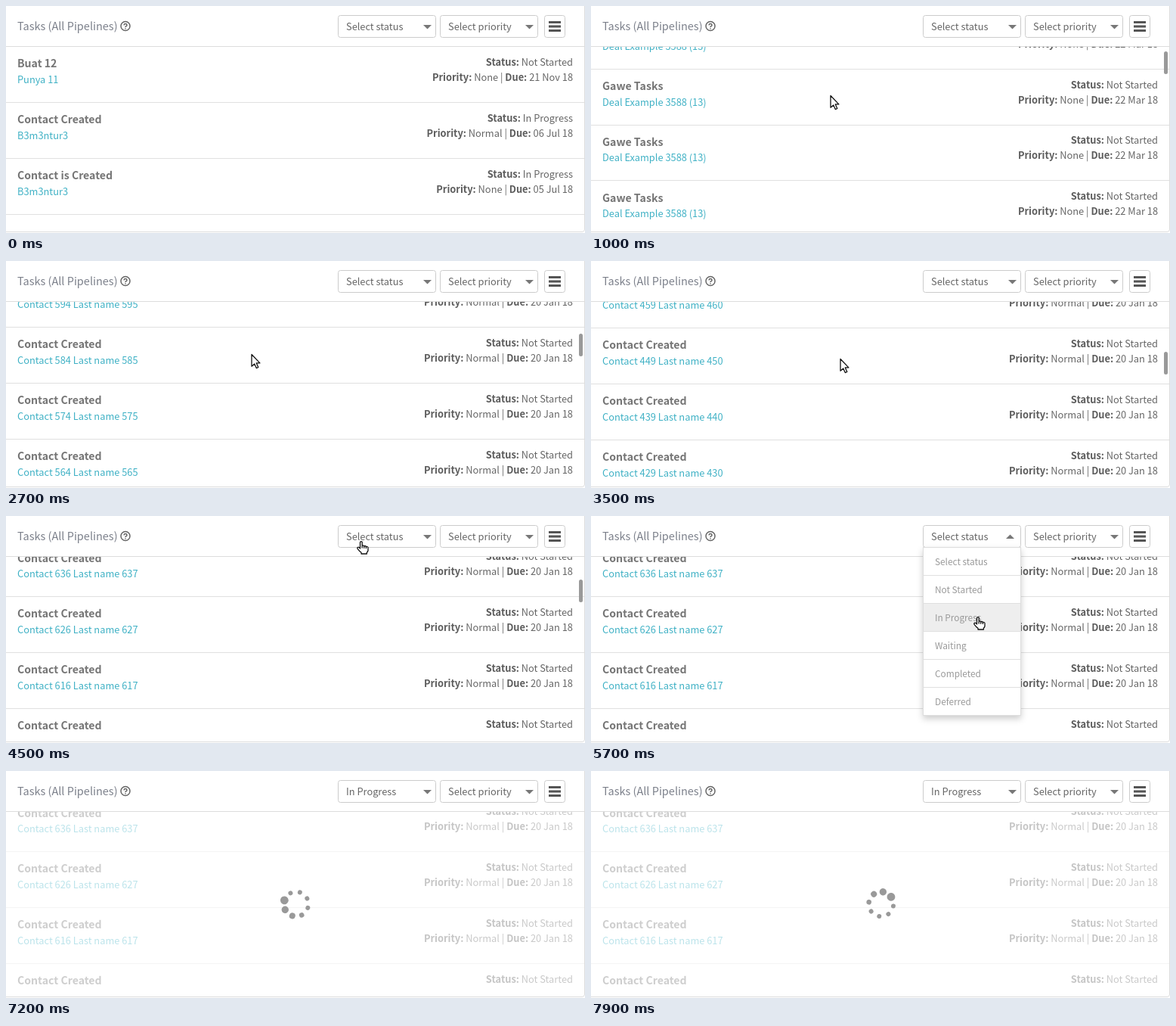
Animation, 766 px wide and 300 px high, one loop 8000 ms. Source, as an HTML page:

```html
<!DOCTYPE html>
<html lang="en">
<head>
<meta charset="utf-8">
<title>Tasks</title>
<style>
html, body { margin: 0; width: 100%; height: 100%; overflow: hidden; background: #fff; }
svg { display: block; width: 766px; height: 300px; }
text { font-family: "Noto Sans CJK JP", "Noto Sans CJK SC", "Noto Sans CJK", "Open Sans", sans-serif; font-size: 12.82px; fill: #666; }
.head { font-size: 14.5px; fill: #7c808b; }
.title { font-size: 14.1px; font-weight: 700; fill: #757575; }
.link tspan { fill: #3fb1c5; }
.meta { text-anchor: end; }
.meta tspan { font-weight: 700; fill: #5c5c5c; }
.item { font-size: 11.84px; fill: #999; }
.box { fill: #fff; stroke: #ccc; }
.line { stroke: #e0e0e0; }
.caret { fill: #777; }
.cursor { fill: #fff; stroke: #111; stroke-width: 1.3; stroke-linejoin: round; }
</style>
</head>
<body>
<svg viewBox="0 0 766 300">
  <defs>
    <clipPath id="view"><rect x="0" y="54" width="765" height="234"/></clipPath>
    <filter id="shade" x="-20%" y="-10%" width="140%" height="125%">
      <feDropShadow dx="0" dy="4" stdDeviation="4" flood-opacity=".2"/>
    </filter>
  </defs>
  <rect width="766" height="300" fill="#fff"/>
  <g clip-path="url(#view)"><g id="list"></g></g>
  <rect id="thumb" x="758" width="5" height="30" rx="2.5" fill="#999"/>
  <path d="M0 53.5H765M765.5 0V295Q765.5 298.5 762 298.5H0" fill="none" stroke="#ddd"/>
  <text class="head" x="15" y="32">Tasks (All Pipelines)</text>
  <g fill="none" stroke="#666" stroke-width="1.5">
    <circle cx="158" cy="26.5" r="6"/>
    <path d="M156 25.3Q156.2 23.6 158 23.6T160 25.2Q160 26.2 158.9 26.7T158 28.2M158 29.2V30.6"/>
  </g>
  <rect class="box" x="439.5" y="12.5" width="129" height="29" rx="3"/>
  <rect class="box" x="574.5" y="12.5" width="129" height="29" rx="3"/>
  <rect class="box" x="712.5" y="12.5" width="27" height="29" rx="3"/>
  <text id="status" x="450" y="32"></text>
  <text x="585" y="32">Select priority</text>
  <path id="caret" class="caret"/>
  <path class="caret" d="M687 25h11l-5.5 5.5z"/>
  <path d="M718 20h16v3h-16zM718 25.5h16v3h-16zM718 31h16v3h-16z" fill="#555"/>
  <g id="menu"></g>
  <g id="spin" fill="#999"></g>
  <path id="arrow" class="cursor" d="M0 .5V16.2L3.7 12.9L6.3 18.6L8.8 17.5L6.3 11.9H10.9Z"/>
  <path id="hand" class="cursor" d="M4.5 10V2Q4.5 .6 5.9 .6T7.2 2V6.2Q8.6 5.4 9.7 6.8Q11.3 6 12.4 7.5Q15 7 15 9.2V12.5Q14.6 14.5 13.4 15V17H6V15.3Q3.5 13.6 1.2 10.4Q.2 8.8 1.6 8.3T4.5 10ZM7.2 6.5V9.5M9.7 7V9.7M12.4 7.8V10"/>
</svg>
<script>
const $ = id => document.getElementById(id);
const LOOP = 8000, STEP = 100, PITCH = 73.8, TOP = 54;
const OPEN = 4800, PICK = 5900;
const options = ["Select status", "Not Started", "In Progress", "Waiting", "Completed", "Deferred"];
const DEAL = "Deal Example 3588 (13)", OWNER = "Bimo Karsanto";

// title, links, status, priority, due date
const first = [
  ["Buat 12", ["Punya 11"], "Not Started", "None", "21 Nov 18"],
  ["Contact Created", ["B3m3ntur3"], "In Progress", "Normal", "06 Jul 18"],
  ["Contact is Created", ["B3m3ntur3"], "In Progress", "None", "05 Jul 18"]
];
const deals = [
  ["Joss Created #2", [OWNER, DEAL], "Completed", "None", "30 Jan 18"],
  ["Gawe Tasks", [OWNER, DEAL], "Not Started", "None", "30 Jan 18"],
  ["Baleni", ["Joss Contact 2", DEAL], "Not Started", "None", "31 Jan 18"]
];

function task(i) {
  if (i < 3) return first[i];
  if (i < 11) return ["Gawe Tasks", [DEAL], "Not Started", "None", "22 Mar 18"];
  if (i < 14) return deals[i - 11];
  const n = (i < 21 ? 806 : i < 31 ? 834 : 839) - 10 * i;
  return ["Contact Created", [`Contact ${n} Last name ${n + 1}`], "Not Started", "Normal", "20 Jan 18"];
}

function row(i, pos) {
  const y = d => Math.round(TOP + (i - pos) * PITCH + d);
  const [title, links, status, prio, due] = task(i);
  return `<text class="title" x="15" y="${y(27.4)}">${title}</text>
    <text class="link" x="15" y="${y(48.1)}">${links.map(s => `<tspan>${s}</tspan>`).join(", ")}</text>
    <text class="meta" x="750" y="${y(25)}"><tspan>Status:</tspan> ${status}</text>
    <text class="meta" x="750" y="${y(45)}"><tspan>Priority:</tspan> ${prio} | <tspan>Due:</tspan> ${due}</text>
    <path class="line" d="M0 ${y(73) + 0.5}H765"/>`;
}

// Each leg: start, end, values reached; the value rests between legs.
const flicks = [[800, 1000, 3.6], [1200, 1900, 11.71], [2000, 2700, 24.539],
  [2900, 3500, 38.526], [3500, 4200, 17.282]];
const moves = [[200, 1000, 317, 118], [1200, 1800, 320, 121], [2000, 2700, 325, 123],
  [2900, 3500, 330, 129], [3500, 4200, 456, 36], [4400, 4800, 486, 25],
  [4900, 5300, 457, 93], [5300, 5700, 506, 133], [5800, 6400, 470, -20]];

function follow(legs, from, t) {
  return legs.reduce((now, [a, b, ...to]) => {
    const u = Math.min(1, Math.max(0, (t - a) / (b - a)));
    return now.map((v, i) => v + (to[i] - v) * u);
  }, from);
}

function menu(hover) {
  const items = options.map((name, i) => {
    const y = 42 + 37 * i;
    return (i === hover ? `<rect x="440" y="${y}" width="128" height="37" fill="#eee"/>` : "") +
      (i ? `<path class="line" d="M440 ${y - 0.5}H568"/>` : "") +
      `<text class="item" x="455" y="${y + 23}">${name}</text>`;
  });
  return `<rect x="439.5" y="41.5" width="129" height="222" fill="#fff" stroke="#ddd" filter="url(#shade)"/>` + items.join("");
}

$("spin").innerHTML = Array.from({ length: 8 }, (_, i) =>
  `<circle cx="16.3" r="${Math.max(3, 5.4 - 0.7 * i)}" transform="rotate(${-45 * i})"/>`).join("");

const show = (id, on) => $(id).setAttribute("visibility", on ? "visible" : "hidden");
const place = (id, x, y) => $(id).setAttribute("transform", `translate(${x} ${y})`);
let last = -1;

function draw(ms) {
  const t = Math.floor(ms % LOOP / STEP) * STEP;
  if (t === last) return;
  last = t;
  const [pos] = follow(flicks, [0], t);
  const [x, y] = follow(moves, [286, -20], t).map(Math.round);
  const open = t >= OPEN && t < PICK, busy = t >= PICK;

  const top = Math.floor(pos), count = pos ? 5 : 3;
  $("list").innerHTML = Array.from({ length: count }, (_, i) => row(top + i, pos)).join("");
  $("list").setAttribute("opacity", busy ? 0.35 : 1);

  show("thumb", pos > 0 && t < 5000);
  $("thumb").setAttribute("y", Math.round(TOP + pos * 1.711));

  $("status").textContent = options[busy ? 2 : 0];
  $("caret").setAttribute("d", open ? "M549 30h11l-5.5 -5.5z" : "M552 25h11l-5.5 5.5z");
  $("menu").innerHTML = open ? menu(Math.floor((y - 42) / 37)) : "";

  show("spin", busy);
  $("spin").setAttribute("transform", `translate(383.8 175.9) rotate(${72 + (t - 6500) * 0.18})`);

  const over = t >= 4200 && t < 6000;
  show("arrow", !over);
  show("hand", over);
  place("arrow", x, y);
  place("hand", x, y);
}

function tick(now) {
  draw(now);
  requestAnimationFrame(tick);
}
draw(0);
requestAnimationFrame(tick);
</script>
</body>
</html>
```
